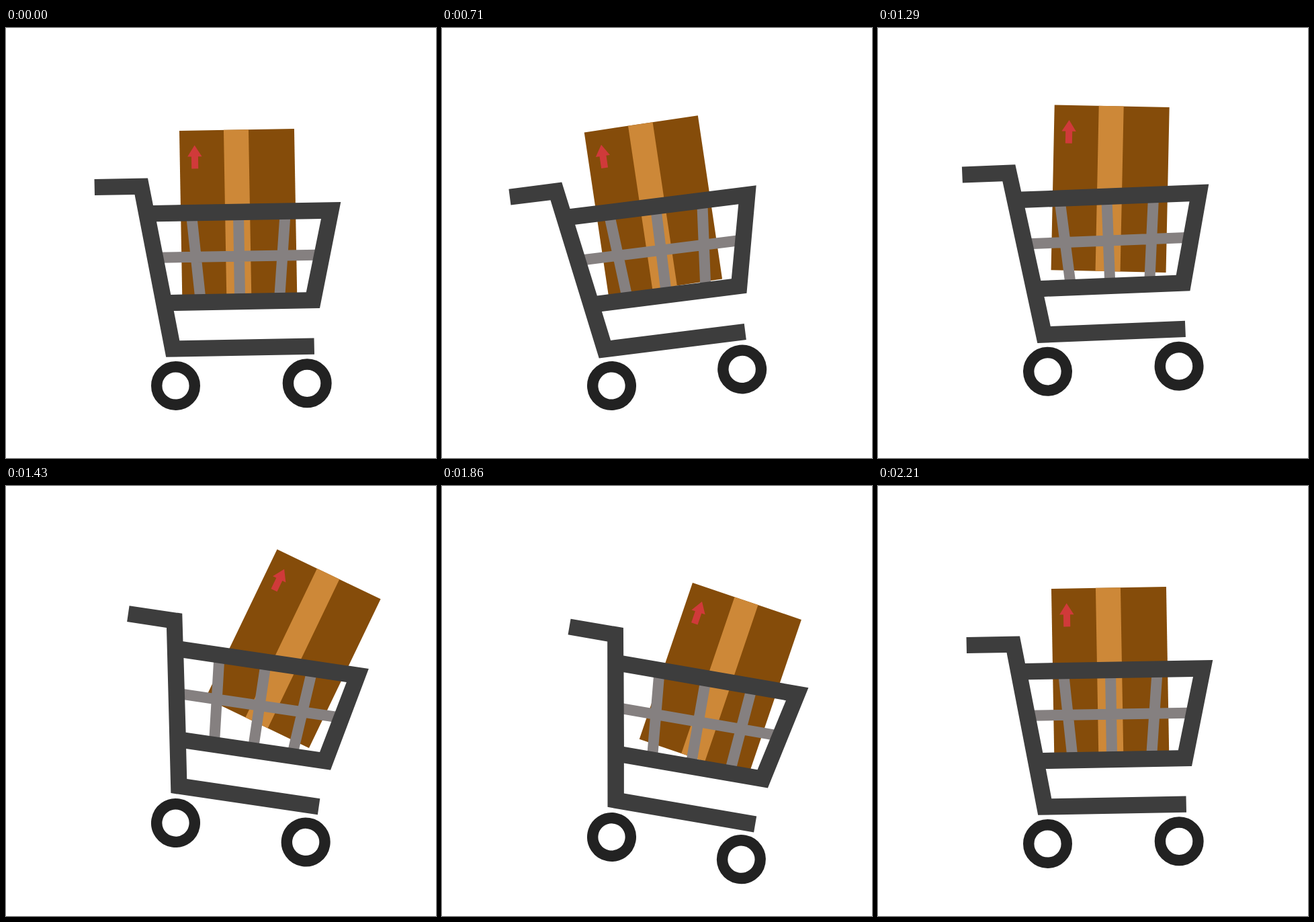
Recreate the animation shown at these times as an HTML page. Size 640x640 px, loop 2.64 s.

```html
<!DOCTYPE html>
<html lang="en">
<head>
<meta charset="utf-8">
<title>Shopping cart</title>
<style>
  html, body { margin: 0; width: 100%; height: 100%; overflow: hidden; background: #fff; }
  svg { display: block; width: 100vw; height: 100vh; }
</style>
</head>
<body>
<svg viewBox="0 0 640 640">
  <g id="box">
    <g transform="translate(345.6 274.5) rotate(-1)">
      <rect x="-85.5" y="-123" width="171" height="246" fill="#854c0a"/>
      <rect x="-19.5" y="-123" width="37" height="246" fill="#cd8838"/>
      <path d="M-63.2-101 L-52.6-84.2 H-58.2 V-66.2 H-68.2 V-84.2 H-74 Z" fill="#d03a3a"/>
    </g>
  </g>
  <g id="cart">
    <path d="M228 341.8 L462 337.7 M276 278 L289.5 404 M346 276 L348.1 404 M415.6 276 L407 404"
          fill="none" stroke="#858080" stroke-width="16"/>
    <path d="M131.5 225 L211 223.4 L219 264 L498.3 259 L467 417 L249.8 421 L258.3 465.2
             L458.5 461.5 L459 485.7 L238.2 489.8 L191.5 248 L132 249 Z
             M224 288.3 L245.3 397 L446.8 393.2 L469 284 Z"
          fill="#3d3d3d" fill-rule="evenodd"/>
    <g fill="none" stroke="#222" stroke-width="16.4">
      <circle cx="252.5" cy="532.5" r="28.3"/>
      <circle cx="448.2" cy="528.8" r="28.3"/>
    </g>
  </g>
</svg>
<script>
const LOOP = 2640, FPS = 14;
const WHEEL = '252.5 532.5', LEFT_CORNER = '262.3 399', RIGHT_CORNER = '433.3 396';
const box = document.getElementById('box');
const cart = document.getElementById('cart');

const progress = (step, from, to) => Math.min(1, Math.max(0, (step - from) / (to - from)));
const smooth = p => p * p * (3 - 2 * p);
const ease = (step, from, to) => smooth(progress(step, from, to));
const hump = (step, from, top, to) => ease(step, from, top) - ease(step, top, to);

function draw(time) {
  // The motion is held on a fixed number of steps per second.
  const step = Math.floor((time % LOOP + 5) * FPS / 1000);

  // The cart leans back, swings forward with a hop, then settles.
  const lean = -11.3 * smooth(progress(step, 2.5, 15) ** 1.25);
  const settle = ease(step, 23.5, 31);
  const cartTilt = lean + 25.95 * ease(step, 15.05, 22) - 14.65 * settle;
  const cartY = -31 * hump(step, 15, 19.8, 29.8);

  // The box rides along, tips over its lower corners and is tossed up.
  const boxTilt = lean - 11 * ease(step, 8.6, 15) + 49 * ease(step, 16, 20) - 26.7 * settle;
  const tip = boxTilt - cartTilt;
  const corner = tip < 0 ? LEFT_CORNER : RIGHT_CORNER;
  const boxY = -38 * hump(step, 15, 19.5, 26.5) - 16 * Math.sin(Math.PI * progress(step, 26, 31));

  const swing = `rotate(${cartTilt} ${WHEEL})`;
  cart.setAttribute('transform', `translate(0 ${cartY}) ${swing}`);
  box.setAttribute('transform',
    `translate(${boxY * 0.06} ${boxY}) ${swing} rotate(${tip} ${corner})`);
}

const start = performance.now();
function tick() {
  draw(performance.now() - start);
  requestAnimationFrame(tick);
}
tick();
</script>
</body>
</html>
```
